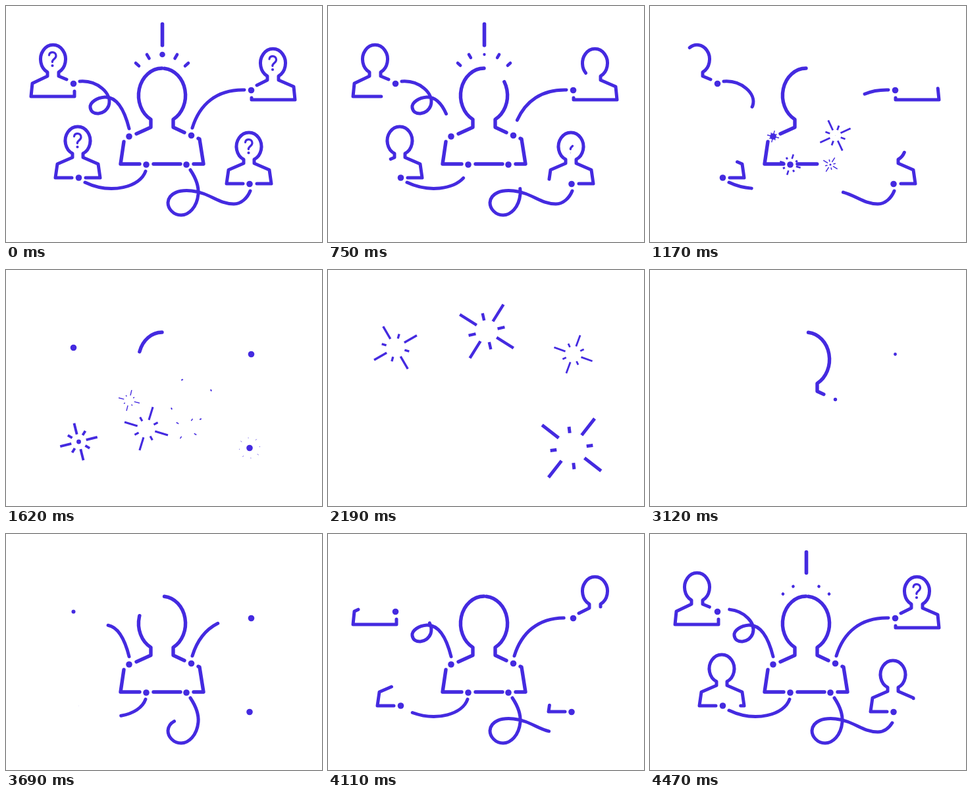
Recreate the animation shown at these times as an HTML page. Size 480 by 360 pixels, loop 4.5 s.

```html
<!DOCTYPE html>
<html lang="en">
<head>
<meta charset="utf-8">
<title>Connected people</title>
<style>
  html, body { margin: 0; width: 100%; height: 100%; overflow: hidden; background: #fff; }
  svg { display: block; width: 100vw; height: 100vh; }
  path, line { fill: none; stroke: #442ae0; stroke-width: 5; stroke-linejoin: round; }
  path { stroke-linecap: round; }
  circle { fill: #442ae0; }
</style>
</head>
<body>
<svg id="stage" viewBox="0 0 480 360"></svg>
<script>
const LOOP = 4500, STEP = 30, HALF = 2500;
const stage = document.getElementById('stage');
const parts = [];

const clamp = x => Math.min(1, Math.max(0, x));
const smooth = x => x * x * (3 - 2 * x);
const out = x => 1 - (1 - x) ** 2;
const phase = (t, [start, length]) => clamp((t - start) / length);

function add(tag, attrs) {
  const el = document.createElementNS('http://www.w3.org/2000/svg', tag);
  for (const k in attrs) el.setAttribute(k, attrs[k]);
  return stage.appendChild(el);
}

// A line that is erased from its start, then drawn again from its start.
// Pieces separated by gaps count as one length.
function stroke(d, gone, back, { ease = smooth, width = 5 } = {}) {
  let total = 0;
  const pieces = d.split(/(?=M)/).map(piece => {
    const el = add('path', { d: piece, style: `stroke-width:${width}` });
    const from = total, length = el.getTotalLength();
    total += length;
    return { el, from, length };
  });
  const drawing = typeof back === 'number' ? [back, 620 + 3.2 * total] : back;
  parts.push(t => {
    const erasing = t < HALF;
    const a = erasing ? total * smooth(phase(t, gone)) : 0;
    const b = erasing ? total : total * ease(phase(t, drawing));
    for (const { el, from, length } of pieces) {
      const s = Math.max(0, a - from), e = Math.min(length, b - from);
      el.style.visibility = e - s > 0.05 ? 'visible' : 'hidden';
      el.style.strokeDasharray = `${Math.max(0, e - s)} 9999`;
      el.style.strokeDashoffset = -s;
    }
  });
}

function dot(cx, cy, r, gone, back) {
  const el = add('circle', { cx, cy, r });
  parts.push(t => el.setAttribute('r', r * smooth(t < HALF ? 1 - phase(t, gone) : phase(t, back))));
}

// Eight rays, long and short in turn, flying outwards.
function burst(x, y, angle, reach, start) {
  const first = reach / 4;
  for (let i = 0; i < 8; i++) {
    const el = add('line', {});
    const short = i % 2;
    const span = (short ? 0.55 : 1) * reach - first;
    const a = (angle + 45 * i) * Math.PI / 180;
    parts.push(t => {
      const v = clamp(phase(t, [start, 800]) * (short ? 1.15 : 1));
      el.style.visibility = v > 0 && v < 1 ? 'visible' : 'hidden';
      el.style.strokeWidth = reach / 12 * clamp(6 * v);
      [v ** 5, out(v)].forEach((p, k) => {
        const r = first + span * p;
        el.setAttribute('x' + (k + 1), x + r * Math.cos(a));
        el.setAttribute('y' + (k + 1), y + r * Math.sin(a));
      });
    });
  }
}

function node(x, y, angle, reach, start, back) {
  dot(x, y, 4.8, [start + 170, 200], [back, 240]);
  burst(x, y, angle, reach, start);
}

function question(x, y, gone, back) {
  stroke(`M${x - 5} ${y - 16}c0 -6 10.5 -6 10.5 1c0 5 -6 5 -5.7 9.5`, gone, back, { width: 3.2 });
  dot(x, y, 2.1, gone, back);
}

// middle person
stroke('M240.5 95.2A35.5 41.5 0 0 1 254 173V185L271 193M292 202L294 203L300 241H285M265 241H224' +
  'M203 241H174L179 207M198 195L220 185V173A35.5 41.5 0 0 1 237 95', [500, 1417], [2662, 1301], { width: 5.4 });
burst(241, 93.5, 32, 53, 1670);

// outer people, each from its node round to the node again; x, y mark the question's dot
const front = 'h-25l3 -21l23 -10v-6a19 21.5 0 1 1 16 0v6l23 10l3 21h-22';
[
  { x: 405, y: 97, gone: 515, d: 'M381 121l16 -8v-6a19 22 0 1 1 17 0v6l23 10l2 20h-66v-3' },
  { x: 70.5, y: 91, gone: 515, d: 'M104 130v8h-66l2 -20l23 -11v-6a19 22 0 1 1 17 0v6l12 5' },
  { x: 108.5, y: 215, gone: 400, d: 'M100 262' + front },
  { x: 368.5, y: 224, gone: 515, d: 'M360 271' + front }
].forEach(({ x, y, gone, d }, i) => {
  stroke(d, [gone, 1078], [3740 + 70 * i, 700]);
  question(x, y, [470 + 50 * i, 190], [4290 + 180 * i, 160]);
});

// connections, from the middle outwards
const link = (d, back) => stroke(d, [518, 1078], back, { ease: out });
link('M187 187C181 163 170 138 150 139C138 140 127 147 128 155C130 168 150 167 156 152C162 133 138 113 112 115', 3483);
link('M283 186C294 150 320 127 362 128', 3330);
link('M212 252C204 276 160 288 120 269', 3440);
link('M280 250C288 262 293 275 292 287C290 308 277 319 266 319C254 319 246 309 246 300' +
  'C247 285 264 280 282 282C310 285 322 302 346 302C358 302 367 292 371 282', 3255);

// nodes: place, ray angle, reach, burst time, return time
node(281.5, 197.5, 65, 34, 832, 2990);
node(274, 242, 32, 18, 876, 3145);
node(213, 242, 17, 37, 1060, 3290);
node(187, 199, 14, 17, 996, 3435);
node(372.5, 128.5, 20, 33, 1622, 3000);
node(370, 271.5, 38, 60, 1600, 3430);
node(102.5, 118.5, 60, 40, 1622, 3550);
node(110.5, 262, -14, 46, 1380, 3660);

// exclamation mark and sparks
stroke('M237.5 27.5V60', [770, 290], [4190, 310], { width: 5.6 });
dot(237.5, 74, 4.3, [620, 260], [4470, 150]);
for (const side of [-1, 1]) {
  const spark = (x, y, dx, dy) =>
    stroke(`M${237 + side * x} ${y}l${side * dx} ${-dy}`, [680, 260], [4460, 140], { width: 4.6 });
  spark(35, 91.5, 5, 4.5);
  spark(19.5, 80, 3.5, 6);
}

const origin = performance.now();
function frame(now) {
  const t = Math.floor(Math.max(0, now - origin) % LOOP / STEP) * STEP;
  parts.forEach(draw => draw(t));
  requestAnimationFrame(frame);
}
frame(origin);
</script>
</body>
</html>
```
